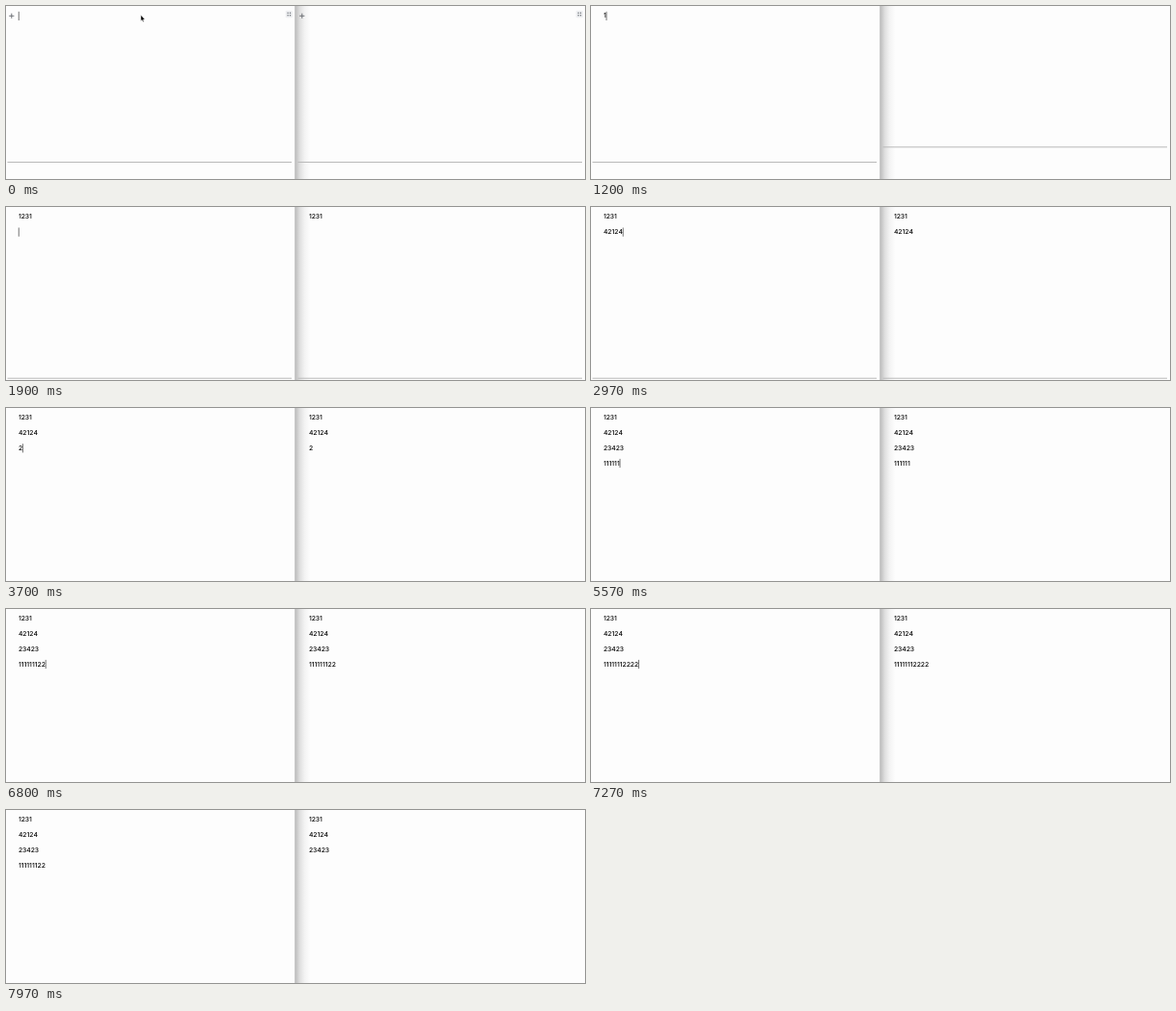
Animation, 600 px wide and 180 px high, one loop 8000 ms. Source, as an HTML page:

```html
<!DOCTYPE html>
<html lang="en">
<head>
<meta charset="utf-8">
<title>Synced editors</title>
<style>
  html, body { margin: 0; width: 100%; height: 100%; overflow: hidden; background: #fdfdfd; }
  svg { display: block; }
  text { font: 500 6.75px Inter, sans-serif; font-kerning: none; text-rendering: geometricPrecision; fill: #000; }
  .rule { fill: #b9b9b9; }
  .caret { fill: #555; }
  .plus { stroke: #62656b; stroke-width: .9; fill: none; }
</style>
</head>
<body>
<svg width="600" height="180" viewBox="0 0 600 180">
  <defs>
    <linearGradient id="shade">
      <stop offset="0" stop-color="#bababa"/>
      <stop offset=".12" stop-color="#c6c6c6"/>
      <stop offset=".32" stop-color="#dedede"/>
      <stop offset=".62" stop-color="#f2f2f2"/>
      <stop offset="1" stop-color="#fdfdfd"/>
    </linearGradient>
    <g id="pane">
      <rect class="rule" x="1.5" width="294.5" height="1"/>
      <path class="plus" d="M3.2 0h5.2M5.8 -2.6v5.2"/>
      <g class="menu">
        <rect x="289.6" y="4.8" width="7.4" height="7.4" rx="1.2" fill="#eff0f2"/>
        <g fill="#6c7078">
          <circle cx="292.1" cy="7.3" r=".75"/><circle cx="294.5" cy="7.3" r=".75"/>
          <circle cx="292.1" cy="9.7" r=".75"/><circle cx="294.5" cy="9.7" r=".75"/>
        </g>
      </g>
    </g>
  </defs>
  <rect width="600" height="180" fill="#fdfdfd"/>
  <rect x="299.2" width="16" height="180" fill="url(#shade)"/>
  <g id="left"></g>
  <g id="right" transform="translate(301)"></g>
  <rect class="caret" id="caret" width=".8" height="9.2"/>
  <path id="pointer" d="M139.8 9.6v5.9l1.3-1.2 .9 2.1 .9-.4-.9-2h1.8z" fill="#000" stroke="#fff" stroke-width=".3"/>
</svg>
<script>
const LOOP = 8000, PITCH = 15.7, TEXT_X = 12.9;
const TYPED = '1231\n42124\n23423\n11111112222';

// [time, typed characters, flags]
// c caret, p plus, t toolbars, m pointer, r right toolbar only,
// l right side one character late, x right side's last block missing
const STEPS = [
  [0, 0, 'cptm'], [100, 0, 'cpt'], [430, 0, 'pt'], [930, 0, 'cpt'],
  [1170, 1, 'clr'], [1200, 1, 'cx'], [1230, 1, 'c'], [1300, 2, 'c'],
  [1470, 3, 'c'], [1570, 4, 'c'], [1900, 5, 'c'], [1970, 5, 'cp'],
  [2400, 6, 'cl'], [2430, 6, 'c'], [2570, 7, 'cx'], [2600, 8, 'c'],
  [2870, 9, 'c'], [2970, 10, 'c'], [3270, 11, 'cl'], [3300, 11, 'c'], [3330, 11, 'cp'],
  [3670, 12, 'cx'], [3700, 12, 'c'], [3800, 13, 'c'], [3900, 14, 'c'],
  [4030, 15, 'c'], [4130, 16, 'c'], [4430, 17, 'c'], [4470, 17, 'cp'],
  [4730, 18, 'c'], [4930, 19, 'c'], [5100, 20, 'cx'], [5130, 20, 'c'],
  [5270, 21, 'cx'], [5300, 21, 'c'], [5430, 22, 'c'], [5530, 23, 'cx'], [5570, 23, 'c'],
  [5730, 24, 'c'], [6230, 24, ''], [6630, 25, 'c'], [6800, 26, 'c'],
  [6930, 27, 'cx'], [6970, 27, 'c'], [7230, 28, 'cx'], [7270, 28, 'c'],
  [7730, 28, ''], [7800, 27, 'x'], [7830, 27, ''], [7970, 26, 'x']
];

const $ = id => document.getElementById(id);
const show = (el, on) => el.setAttribute('visibility', on ? 'visible' : 'hidden');

function makePane(id) {
  const root = $(id);
  root.append(...$('pane').cloneNode(true).children);
  const rows = [0, 1, 2, 3].map(i => {
    const row = document.createElementNS('http://www.w3.org/2000/svg', 'text');
    row.setAttribute('x', TEXT_X);
    row.setAttribute('y', 12.45 + i * PITCH);
    root.append(row);
    return row;
  });
  const find = name => root.querySelector('.' + name);
  return { rows, rule: find('rule'), plus: find('plus'), menu: find('menu') };
}

function drawPane(pane, lines, plus, menu) {
  const last = lines.length - 1;
  pane.rows.forEach((row, i) => row.textContent = lines[i] || '');
  pane.rule.setAttribute('y', 162 + last * PITCH);
  pane.plus.setAttribute('transform', `translate(0 ${10.3 + Math.max(last, 0) * PITCH})`);
  show(pane.plus, plus);
  show(pane.menu, menu);
}

const left = makePane('left'), right = makePane('right');
const linesAt = n => TYPED.slice(0, n).split('\n');

function draw([, count, flags]) {
  const has = f => flags.includes(f);
  const lines = linesAt(count);
  const copy = linesAt(has('l') ? count - 1 : count);
  if (has('x')) copy.pop();
  const rightTools = has('t') || has('r');
  drawPane(left, lines, has('p'), has('t'));
  drawPane(right, copy, rightTools, rightTools);

  const last = lines.length - 1;
  const width = lines[last] ? left.rows[last].getComputedTextLength() : 0;
  $('caret').setAttribute('x', TEXT_X + width - .1);
  $('caret').setAttribute('y', 5.8 + last * PITCH);
  show($('caret'), has('c'));
  show($('pointer'), has('m'));
}

const start = performance.now();
let current;
function tick() {
  const t = Math.max(0, performance.now() - start) % LOOP;
  const step = STEPS.filter(s => s[0] <= t).pop();
  if (step !== current) draw(current = step);
  requestAnimationFrame(tick);
}
tick();
</script>
</body>
</html>
```
